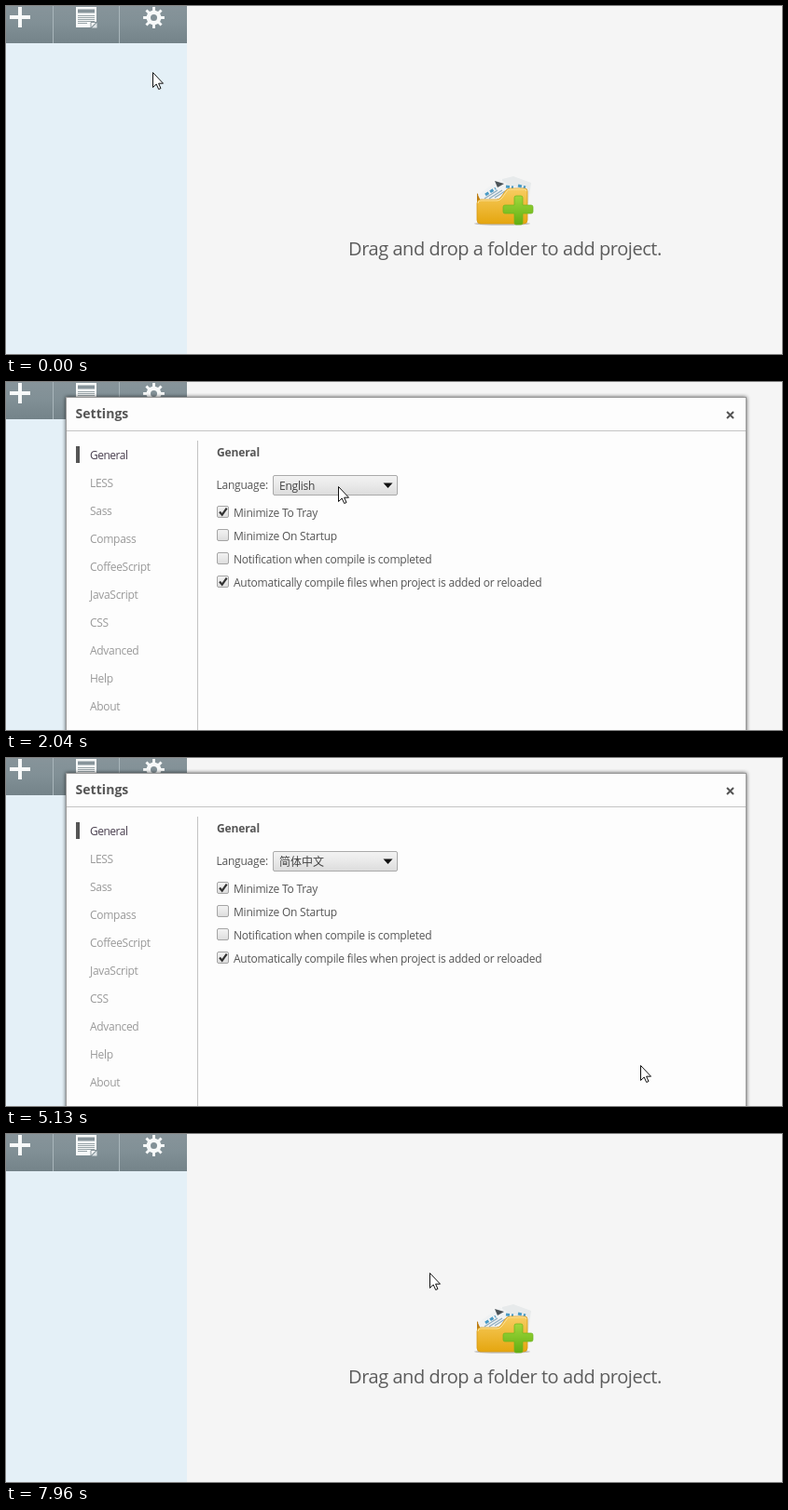
An HTML page that plays this animation: 832x374 px, repeating every 8000 ms.

```html
<!DOCTYPE html>
<html lang="en">
<head>
<meta charset="utf-8">
<title>Settings language menu</title>
<style>
html, body { margin: 0; width: 100%; height: 100%; overflow: hidden; background: #f5f5f5; }
svg { display: block; width: 100%; height: 100%; }
text { font-family: "Open Sans", "Noto Sans", sans-serif; font-size: 12px; letter-spacing: -.22px; fill: #555; }
.hint { font-size: 20px; letter-spacing: -.44px; fill: #5c5c5c; }
.title { font-size: 14px; font-weight: bold; letter-spacing: .05px; }
.head { font-weight: bold; letter-spacing: -.12px; }
.tab { letter-spacing: -.3px; fill: #999; }
.tab.on { fill: #4a4050; letter-spacing: -.5px; }
.pick { fill: #444; }
.cjk { font-family: "Noto Sans CJK SC", "Noto Sans CJK", sans-serif; letter-spacing: 0; }
.cjk.tc { font-family: "Noto Sans CJK TC", "Noto Sans CJK SC", sans-serif; }
.cjk.ja { font-family: "Noto Sans CJK JP", "Noto Sans CJK SC", sans-serif; }
.hot { fill: #fff; }
</style>
</head>
<body>
<svg viewBox="0 0 832 374" preserveAspectRatio="none">
  <defs>
    <linearGradient id="bar" x2="0" y2="1">
      <stop stop-color="#87949a"/><stop offset=".45" stop-color="#819096"/><stop offset="1" stop-color="#748389"/>
    </linearGradient>
    <linearGradient id="blue" x2="0" y2="1">
      <stop stop-color="#36a8de"/><stop offset="1" stop-color="#2196d3"/>
    </linearGradient>
    <linearGradient id="button" x2="0" y2="1">
      <stop stop-color="#f3f3f3"/><stop offset=".5" stop-color="#e9e9e9"/><stop offset="1" stop-color="#dcdcdc"/>
    </linearGradient>
    <linearGradient id="folder" x2="0" y2="1">
      <stop stop-color="#f8cd62"/><stop offset="1" stop-color="#e5a60f"/>
    </linearGradient>
    <linearGradient id="green" x2="0" y2="1">
      <stop stop-color="#a0d83c"/><stop offset="1" stop-color="#62ae12"/>
    </linearGradient>
    <filter id="soft" x="-5%" y="-5%" width="110%" height="110%"><feGaussianBlur stdDeviation="2"/></filter>
  </defs>

  <rect width="832" height="374" fill="#f5f5f5"/>
  <rect width="194" height="374" fill="#e4f0f7"/>
  <rect width="194" height="40" fill="url(#bar)"/>
  <rect id="hover" x="122" width="72" height="40" fill="url(#blue)"/>
  <path d="M50.5 0V40M121.5 0V40" stroke="#a9b6bb"/>

  <g fill="#f7f9f9">
    <path d="M13 1h4v9h9v4h-9v9h-4v-9h-9v-4h9z"/>
    <path d="M75 1h22v16l-6 6h-16z"/>
    <path d="M92 23.5l5.5-5.5v5.5z" fill="#dfe5e7"/>
    <path id="gear" fill-rule="evenodd"/>
  </g>
  <path d="M77 3.5h18v4h-18z" fill="#87949a"/>
  <path d="M77 10.5h18M77 12.5h18M77 14.5h18M77 16.5h18M77 18.5h10" stroke="#8d9a9f" stroke-width=".9"/>
  <path d="M91 23v-5.5h6" fill="none" stroke="#87949a"/>

  <g id="project">
    <ellipse cx="532" cy="234" rx="30" ry="1.8" fill="#aaa" opacity=".7"/>
    <path d="M505 201l4 5v20h-4z" fill="#bd7d12"/>
    <path d="M532 186l12-3 19 7-3 22-30 4z" fill="#e7eaeb"/>
    <path d="M506 203l23-17 11 7 15 3v18h-44z" fill="#f0f2f3"/>
    <path d="M524 188l10 3-7 4z" fill="#4b5358"/>
    <path d="M514 203l11-7M536 194l8 1M549 193l8 2" stroke="#4a9bc5" stroke-width="3" stroke-dasharray="4 2"/>
    <path d="M513 207l14-9M518 207l14-9M524 206l11-7" stroke="#8eacbe" stroke-width="1.3"/>
    <path d="M505 212q0-4 4-4h17q3 0 5-3l5-7q2-2 5-2h15q3 0 3 3v31q0 4-4 4h-46q-4 0-4-4z" fill="url(#folder)" stroke="#d79a18" stroke-width=".8"/>
    <path d="M506 212q0-3 3-3h18q3 0 5-3l5-7q1-2 4-2h15q2 0 2 2" fill="none" stroke="#fbe19b"/>
    <path d="M547 204h5q2 0 2 2v8h9q2 0 2 2v5q0 2-2 2h-9v10q0 2-2 2h-5q-2 0-2-2v-10h-10q-2 0-2-2v-5q0-2 2-2h10v-8q0-2 2-2z" fill="url(#green)" stroke="#6cb51d" stroke-width=".7"/>
    <text class="hint" x="367" y="268">Drag and drop a folder to add project.</text>
  </g>

  <g id="dialog">
    <rect x="64" y="16" width="730" height="380" fill="#000" opacity=".65" filter="url(#soft)"/>
    <rect x="64.5" y="16.5" width="729" height="380" fill="#fdfdfd" stroke="#999"/>
    <g id="content">
      <text class="title" x="74.5" y="39">Settings</text>
      <path d="M773 32l7 7M780 32l-7 7" stroke="#555" stroke-width="2"/>
      <path d="M65 52.5H793M205.5 63V374" stroke="#c4c4c4"/>
      <rect x="75" y="69" width="4" height="18" fill="#555"/>
      <g id="tabs"></g>
      <text class="head" x="226" y="80">General</text>
      <text x="225.5" y="115">Language:</text>
      <g id="checks"></g>
      <rect id="select" x="286.5" y="100.5" width="133" height="21" rx="1.5" fill="url(#button)"/>
      <path d="M404.5 108.500h10l-5 5.500z" fill="#111"/>
      <text id="value" x="293" y="116"></text>
      <g id="list">
        <rect x="286.5" y="122.5" width="133" height="160" fill="#fff" stroke="#6f97d0"/>
        <rect id="mark" x="287" width="132" height="17" fill="#1e90ff"/>
        <g id="items"></g>
      </g>
    </g>
  </g>
  <path id="cursor" d="M.5 .5V16.500L4.200 13L6.700 18.500L9 17.500L6.600 12.200H11.500Z" fill="#fff" stroke="#111"/>
</svg>
<script>
const LOOP = 8000;
const $ = id => document.getElementById(id);

function add(parent, tag, attrs, text = "") {
  const el = document.createElementNS("http://www.w3.org/2000/svg", tag);
  for (const key in attrs) el.setAttribute(key, attrs[key]);
  el.textContent = text;
  return parent.appendChild(el);
}

function gearPath(cx, cy) {
  let d = "";
  const teeth = 8, step = 2 * Math.PI / teeth;
  const corners = [[-.23, 8], [-.16, 11.5], [.16, 11.5], [.23, 8]];
  for (let i = 0; i < teeth; i++) {
    for (const [turn, r] of corners) {
      const a = (i + turn) * step;
      d += (d ? "L" : "M") + (cx + r * Math.cos(a)).toFixed(2) + " " + (cy + r * Math.sin(a)).toFixed(2);
    }
  }
  return d + `Z M${cx - 3.5} ${cy}a3.5 3.5 0 1 0 7 0a3.5 3.5 0 1 0 -7 0Z`;
}

const tabs = ["General", "LESS", "Sass", "Compass", "CoffeeScript", "JavaScript", "CSS", "Advanced", "Help", "About"];
const checks = [
  ["Minimize To Tray", true],
  ["Minimize On Startup", false],
  ["Notification when compile is completed", false],
  ["Automatically compile files when project is added or reloaded", true]
];
// label, baseline, font class
const languages = [
  ["English", 135, ""], ["简体中文", 151, "cjk"], ["正體中文", 168, "cjk tc"], ["日本語", 185, "cjk ja"],
  ["Deutsch", 201, ""], ["Français", 217, ""], ["Português Brasileiro", 232, ""],
  ["Spanish", 248, ""], ["Русский", 263, ""], ["Italiano", 278, ""]
];

$("gear").setAttribute("d", gearPath(158.5, 12.5));
tabs.forEach((name, i) => add($("tabs"), "text", { class: i ? "tab" : "tab on", x: 90, y: 83 + 30 * i }, name));
checks.forEach(([label, on], i) => {
  const y = 133.5 + 25 * i;
  add($("checks"), "rect", { x: 226.5, y, width: 12, height: 12, rx: 1.5, fill: "url(#button)", stroke: "#a5a5a5" });
  if (on) add($("checks"), "path", { d: `M229 ${y + 6}l2.700 3.200l5 -7`, fill: "none", stroke: "#333", "stroke-width": 2.2 });
  add($("checks"), "text", { x: 244, y: y + 11.5 }, label);
});
const items = languages.map(([name, y]) => add($("items"), "text", { x: 293, y }, name));

// Each track holds its value until the next entry.
const cursorTrack = [
  [0, 157, 71], [120, 159, 64], [260, 162, 46], [400, 164, 31], [550, 164, 25],
  [1650, 188, 40], [1780, 262, 72], [1910, 335, 104], [2040, 356, 112],
  [2180, 355, 113], [2360, 350, 128], [2490, 343, 158], [2620, 338, 180],
  [2770, 335, 171], [2900, 333, 165], [3030, 332, 160], [3150, 331, 153], [3280, 330, 148], [3400, 329, 145],
  [4340, 338, 150], [4470, 380, 172], [4610, 450, 212], [4740, 540, 260],
  [4880, 620, 301], [5010, 680, 330], [5150, 712, 344], [5280, 723, 348],
  [5400, 739, 360], [5550, 739, 400], [5830, 716, 297], [5960, 707, 309], [6090, 710, 325], [6220, 710, 400],
  [7270, 620, 331], [7410, 553, 272], [7540, 533, 214], [7680, 460, 160], [7810, 388, 117], [7960, 454, 149]
];
const dialogTrack = [[0, 0], [830, .35], [960, .75], [1100, 1], [6870, .6], [7000, .2], [7140, 0]];
const markTrack = [[0, 0], [2490, 2], [2620, 3], [2770, 2], [3150, 1]];

const at = (track, t) => track.filter(key => key[0] <= t).pop();
const show = (id, on) => $(id).setAttribute("visibility", on ? "inherit" : "hidden");
const between = (t, from, to) => t >= from && t < to;

function draw(t) {
  const [, x, y] = at(cursorTrack, t);
  $("cursor").setAttribute("transform", `translate(${x} ${y})`);

  const opacity = at(dialogTrack, t)[1];
  show("dialog", opacity > 0);
  $("dialog").setAttribute("opacity", opacity);
  show("content", t >= 1220);
  show("hover", between(t, 400, 1650));

  const open = between(t, 2310, 4060);
  const focused = between(t, 2180, 4340);
  const [name, , font] = languages[t < 4060 ? 0 : 1];
  $("select").setAttribute("stroke", focused ? "#5b93e0" : "#aaa");
  $("value").textContent = name;
  $("value").setAttribute("class", "pick " + font);

  show("list", open);
  const marked = at(markTrack, t)[1];
  $("mark").setAttribute("y", languages[marked][1] - 13);
  items.forEach((el, i) => el.setAttribute("class", languages[i][2] + (i === marked ? " hot" : " pick")));
}

const start = performance.now();
function tick() {
  draw((performance.now() - start) % LOOP);
  requestAnimationFrame(tick);
}
tick();
</script>
</body>
</html>
```
